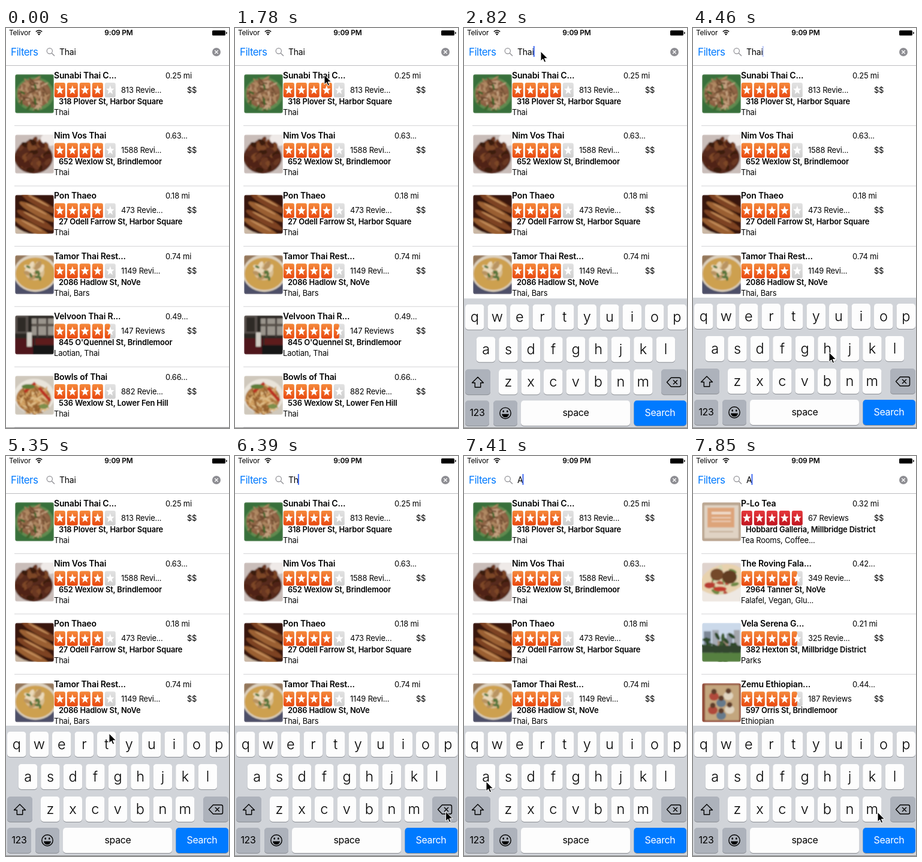
An HTML page for the animation above (8000 ms loop, 372 by 666 pixels).

```html
<!DOCTYPE html>
<html lang="en">
<head>
<meta charset="utf-8">
<title>Restaurant search</title>
<style>
html, body { margin: 0; width: 100%; height: 100%; overflow: hidden; background: #fff; }
svg { display: block; }
#stage { font-family: Inter, Roboto, sans-serif; letter-spacing: -.01em; }
</style>
</head>
<body>
<svg id="stage" width="372" height="666" viewBox="0 0 372 666"></svg>
<script>
const rect = (x, y, w, h, fill, more = '') =>
  `<rect x="${x}" y="${y}" width="${w}" height="${h}" fill="${fill}" ${more}/>`;
const oval = (x, y, rx, ry, fill, more = '') =>
  `<ellipse cx="${x}" cy="${y}" rx="${rx}" ry="${ry}" fill="${fill}" ${more}/>`;
const path = (d, fill, more = '') => `<path d="${d}" fill="${fill}" ${more}/>`;
const line = (d, color, width, more = '') =>
  path(d, 'none', `stroke="${color}" stroke-width="${width}" ${more}`);
const text = (x, y, size, str, more = '') =>
  `<text x="${x}" y="${y}" font-size="${size}" ${more}>${str}</text>`;
const bold = 'font-weight="600"', mid = 'text-anchor="middle"';

// Scattered food pieces from a seeded generator
function bits(seed, n, cx, cy, r, rx, ry, colors) {
  const rnd = () => (seed = seed * 16807 % 2147483647) / 2147483647;
  rnd();
  let out = '';
  for (let i = 0; i < n; i++) {
    const a = rnd() * 6.28, d = r * Math.sqrt(rnd());
    const x = (cx + d * Math.cos(a)).toFixed(1), y = (cy + d * Math.sin(a)).toFixed(1);
    out += oval(x, y, rx, ry, colors[i % colors.length],
      `transform="rotate(${Math.floor(rnd() * 180)} ${x} ${y})"`);
  }
  return out;
}

const photos = {
  noodles: rect(0, 0, 65, 65, '#39703a') + oval(33, 33, 32, 28, '#5f8a50') +
    oval(32, 32, 28, 24, '#8a6142') +
    bits(5, 90, 32, 31, 25, 7, 1.4, ['#b08a64', '#6b4a2e', '#c4a281', '#94694a']) +
    bits(9, 8, 28, 42, 22, 5, 1.6, ['#40642a']),
  fried: rect(0, 0, 65, 65, '#c9bdb9') + oval(57, 8, 14, 11, '#efeae8') + oval(31, 38, 32, 27, '#56291a') +
    bits(21, 40, 31, 35, 27, 7, 4, ['#6b3720', '#3a1a10', '#7d4628', '#4f2414']),
  ribs: rect(0, 0, 65, 65, '#37190d') +
    [0, 1, 2, 3].map(i => oval(32 + i * 3, 12 + i * 14, 34, 6.5, i % 2 ? '#9a5f33' : '#7d4220', 'transform="rotate(28 32 32)"') +
      oval(28 + i * 3, 9 + i * 14, 20, 1.6, '#c08a58', 'transform="rotate(28 32 32)"')).join('') +
    path('M0 52Q14 64 30 65H0Z', '#cbb8a4'),
  curry: rect(0, 0, 65, 65, '#94775a') + rect(0, 42, 65, 23, '#4d5068') + oval(34, 30, 36, 31, '#ddd2c0') +
    oval(34, 31, 33, 27, '#cda050') + oval(33, 28, 16, 14, '#d8be92') +
    bits(14, 16, 33, 27, 14, 7, 3.5, ['#ead9ba', '#b99462']) + bits(3, 7, 34, 28, 18, 4, 2, ['#56753a']),
  bar: rect(0, 0, 65, 65, '#2a2523') + rect(0, 0, 22, 30, '#57504b') + rect(4, 3, 14, 24, '#2f2a27') +
    rect(28, 5, 37, 28, '#9a948c') + rect(36, 4, 3, 32, '#3f3936') + rect(52, 4, 3, 32, '#3f3936') +
    rect(28, 14, 37, 4, '#57504a') + rect(0, 38, 32, 27, '#50191b') + rect(20, 28, 8, 24, '#cfcac3') +
    rect(34, 38, 31, 11, '#5d1d1e') + rect(30, 50, 35, 15, '#171314'),
  stirfry: rect(0, 0, 65, 65, '#cfc8bc') + oval(32, 34, 34, 29, '#e9e4da') + oval(31, 38, 29, 23, '#b07c42') +
    bits(31, 75, 31, 39, 25, 7, 1.5, ['#d3a466', '#94602f', '#dfbd88']) +
    line('M16 27L34 12M40 20L59 42', '#bb3322', 5) + oval(22, 18, 11, 4, '#5d7d38') + oval(48, 51, 8, 4, '#7d8f4c'),
  card: rect(0, 0, 65, 65, '#b9a48f') + rect(4, 5, 57, 55, '#e0d3c4') + rect(9, 9, 45, 33, '#dda47a') +
    rect(16, 16, 32, 4, '#f0dccb') + rect(16, 25, 32, 1.5, '#f0dccb') + rect(16, 31, 32, 1.5, '#f0dccb') +
    rect(12, 48, 40, 2, '#c3ae96'),
  wrap: rect(0, 0, 65, 65, '#dfd3cd') + oval(34, 30, 38, 26, '#e8d2ae', 'transform="rotate(-18 34 30)"') +
    bits(8, 24, 33, 29, 24, 7, 3, ['#6f8a45', '#d5d6b0', '#b9553f']) + oval(25, 20, 11, 10, '#74492a') +
    oval(46, 24, 12, 11, '#623c22') + oval(30, 44, 11, 4, '#c23c2e') + oval(12, 38, 8, 5, '#b83c30') +
    path('M0 46Q32 64 65 40V65H0Z', '#eee8e2'),
  park: rect(0, 0, 65, 65, '#cbd9ea') + rect(3, 14, 12, 32, '#7d8896') + rect(17, 6, 11, 38, '#a5abb5') +
    rect(41, 18, 10, 28, '#8f97a4') + rect(53, 8, 10, 38, '#a3a5ab') + rect(26, 30, 18, 14, '#a68d7c') +
    bits(17, 30, 32, 43, 30, 7, 3, ['#2f4a2a', '#3d5b33']) + rect(0, 0, 65, 12, '#cbd9ea') +
    rect(0, 38, 65, 12, '#33452e') + rect(0, 50, 65, 15, '#57803f'),
  book: rect(0, 0, 65, 65, '#8f4636') + rect(5, 3, 57, 59, '#c3a67e') +
    [[20, 14], [44, 13], [32, 25], [18, 37], [46, 36], [32, 46]].map(([x, y], i) =>
      oval(x, y + 8, 8, 7, ['#b04a3b', '#e0d4c0', '#667a8c'][i % 3]) + oval(x, y, 4.5, 4.5, '#5f3d2c')).join('')
};

function star(cx, cy, rx, ry) {
  let d = 'M';
  for (let i = 0; i < 10; i++) {
    const a = i * Math.PI / 5, k = i % 2 ? .42 : 1;
    d += (cx + rx * k * Math.sin(a)).toFixed(1) + ' ' + (cy - ry * k * Math.cos(a)).toFixed(1) + ' ';
  }
  return path(d + 'Z', '#fff');
}

function rating(score, hue) {
  let out = '';
  for (let i = 0; i < 5; i++) {
    const x = 80.8 + i * 21, part = Math.min(1, Math.max(0, score - i));
    out += rect(x, 28.5, 18, 24.5, 'url(#gray)', 'rx="3"');
    if (part) out += rect(x, 28.5, 18 * part, 24.5, `url(#${hue})`, 'rx="3"');
    out += star(x + 9, 41, 7.2, 8.2);
  }
  return out;
}

function row([photo, name, dist, score, reviews, address, kind, hue = 'orange'], i) {
  const y = 62.5 + i * 100.4;
  return `<g transform="translate(0 ${y.toFixed(1)})">` +
    `<svg x="15" y="14.5" width="65" height="65"><g clip-path="url(#round)"><g filter="url(#soft)">${photos[photo]}</g></g></svg>` +
    text(80, 21, 14, name, bold) + text(266, 21, 12.9, dist) + rating(score, hue) +
    text(192, 45, 12.9, reviews) + text(302, 45, 12.9, '$$') +
    text(88, 64, 12.9, address, bold) + text(80, 82, 12.9, kind) +
    rect(14, 99.6, 358, 1, '#d3d3d6') + '</g>';
}

const thai = [
  ['noodles', 'Sunabi Thai C...', '0.25 mi', 4, '813 Revie...', '318 Plover St, Harbor Square', 'Thai'],
  ['fried', 'Nim Vos Thai', '0.63...', 4, '1588 Revi...', '652 Wexlow St, Brindlemoor', 'Thai'],
  ['ribs', 'Pon Thaeo', '0.18 mi', 4, '473 Revie...', '27 Odell Farrow St, Harbor Square', 'Thai'],
  ['curry', 'Tamor Thai Rest...', '0.74 mi', 4, '1149 Revi...', '2086 Hadlow St, NoVe', 'Thai, Bars'],
  ['bar', 'Velvoon Thai R...', '0.49...', 4.5, '147 Reviews', "845 O'Quennel St, Brindlemoor", 'Laotian, Thai'],
  ['stirfry', 'Bowls of Thai', '0.66...', 4, '882 Revie...', '536 Wexlow St, Lower Fen Hill', 'Thai']
];
const other = [
  ['card', 'P-Lo Tea', '0.32 mi', 5, '67 Reviews', 'Hobbard Galleria, Millbridge District', 'Tea Rooms, Coffee...', 'red'],
  ['wrap', 'The Roving Fala...', '0.42...', 4.5, '349 Revie...', '2964 Tanner St, NoVe', 'Falafel, Vegan, Glu...'],
  ['park', 'Vela Serena G...', '0.21 mi', 4.5, '325 Revie...', '382 Hexton St, Millbridge District', 'Parks'],
  ['book', 'Zemu Ethiopian...', '0.44...', 4.5, '187 Reviews', '597 Orris St, Brindlemoor', 'Ethiopian']
];

const key = (x, y, w, fill = '#fdfdfd') =>
  rect(x, y + 1, w, 42, '#8b8e94', 'rx="5"') + rect(x, y, w, 42, fill, 'rx="5"');

function keyboard(upper) {
  const gray = '#adb2bb';
  let out = rect(0, 449, 372, 217, '#d1d4d9');
  [['qwertyuiop', 2, 459], ['asdfghjkl', 20.7, 513], ['zxcvbnm', 58, 567]].forEach(([chars, x0, y]) =>
    [...chars].forEach((c, i) => {
      const x = x0 + i * 37.5;
      out += key(x, y, 31.5) + (upper
        ? text(x + 15.8, y + 29, 22, c.toUpperCase(), mid)
        : text(x + 15.8, y + 28.5, 23.5, c, mid + ' font-weight="350"'));
    }));
  const label = (x, str, color = '#000') => text(x, 645, 15.9, str, `${mid} fill="${color}" letter-spacing="-.3"`);
  return out + key(2, 567, 42, upper ? '#fdfdfd' : gray) +
    path('M23 580L32.5 589.5H27.7V597H18.3V589.5H13.5Z', upper ? '#000' : 'none',
      'stroke="#000" stroke-width="1.4" stroke-linejoin="round"') +
    key(329, 567, 42, gray) +
    line('M338.5 588.5L345.5 581H359Q361.5 581 361.5 583.5V593.5Q361.5 596 359 596H345.5ZM349 585L356 592M356 585L349 592', '#000', 1.4, 'stroke-linejoin="round"') +
    key(2, 619, 40, gray) + label(22, '123') +
    key(49, 619, 40, gray) + oval(69, 640, 9.2, 9.2, 'none', 'stroke="#000" stroke-width="1.4"') +
    oval(65.7, 637, 1.3, 1.8, '#000') + oval(72.3, 637, 1.3, 1.8, '#000') +
    path('M63 641.5H75Q74 647 69 647T63 641.5Z', '#000') +
    key(95, 619, 182) + label(186.5, 'space') +
    key(283.5, 619, 87.5, upper ? gray : '#007aff') + label(327, 'Search', upper ? '#7f848c' : '#fff');
}

const gradient = (id, top, bottom) =>
  `<linearGradient id="${id}" x2="0" y2="1"><stop stop-color="${top}"/><stop offset="1" stop-color="${bottom}"/></linearGradient>`;
const $ = id => document.getElementById(id);

$('stage').innerHTML = '<defs>' + gradient('orange', '#f58a3c', '#e9480f') + gradient('red', '#e5383c', '#c0151f') +
  gradient('gray', '#e2e2e2', '#cfcfcf') +
  '<filter id="soft"><feGaussianBlur stdDeviation=".8"/></filter>' +
  '<clipPath id="round"><rect width="65" height="65" rx="4"/></clipPath></defs>' +
  rect(0, 0, 372, 666, '#fff') +
  text(5, 12, 11.9, 'Telivor') + text(188, 12, 11.9, '9:09 PM', mid + ' ' + bold) +
  line('M49.8 6.3Q55 1.8 60.2 6.3M51.8 8.5Q55 5.8 58.2 8.5', '#000', 1.5) + path('M53 10Q55 8.4 57 10L55 12.3Z', '#000') +
  rect(344, 4, 22, 8.5, '#000', 'rx="1.5"') + rect(367, 6.5, 1.6, 3.5, '#000', 'rx=".8"') +
  text(8, 46, 16.9, 'Filters', 'fill="#007aff" letter-spacing="-.5"') +
  oval(72.8, 38.3, 4.6, 4.6, 'none', 'stroke="#8e8e93" stroke-width="1.2"') + line('M76.2 41.7L81 46.5', '#8e8e93', 1.3) +
  text(89, 45, 13.9, '', 'id="query"') +
  text(89, 45, 13.9, 'eg. chinese food, burger', 'id="hint" fill="#98989d" letter-spacing="-.2"') +
  `<g id="clear">${oval(351, 40, 7, 7, '#8e8e93')}${line('M348.3 37.3L353.7 42.7M353.7 37.3L348.3 42.7', '#fff', 1.3)}</g>` +
  rect(0, 30, 2, 18, '#426bf2', 'id="caret"') +
  rect(0, 62, 372, 1, '#bcbcbf') +
  `<g id="thai">${thai.map(row).join('')}</g><g id="other">${other.map(row).join('')}</g>` +
  `<g id="keys"><g id="lower">${keyboard(false)}</g><g id="upper">${keyboard(true)}</g></g>` +
  rect(0, 665, 372, 1, '#8c8c8c') +
  path('M0 0V16L3.7 12.6 6.1 18 8.6 17 6.3 11.7H11.5Z', '#000', 'id="cursor" stroke="#fff" stroke-width="1"');

// Pointer stops: step, x, y
const stops = [
  [0, 310, 655], [6, 147, 245], [7, 149, 232], [10, 149, 78], [12, 121, 38], [14, 121, 38], [17, 128, 39],
  [20, 130, 44], [22, 184, 450], [23, 184, 450], [25, 174, 464], [28, 227, 540], [29, 231, 548], [31, 30, 545],
  [32, 30, 542], [34, 172, 462], [36, 278, 480], [38, 359, 632], [39, 352, 592], [44, 351, 592], [46, 49, 591],
  [48, 37, 542], [49, 37, 542], [51, 308, 593]
];
function pointer(n) {
  const i = Math.max(1, stops.findIndex(s => s[0] >= n));
  const [a, ax, ay] = stops[i - 1], [b, bx, by] = stops[i], k = (n - a) / (b - a);
  return `translate(${ax + (bx - ax) * k} ${ay + (by - ay) * k})`;
}
const show = (id, on) => $(id).style.display = on ? '' : 'none';

function draw(ms) {
  const n = Math.min(51, Math.floor((ms - 298) / 148)), t = 300 + 148 * n;
  const typed = n >= 48 ? 'A' : 'Thai'.slice(0, Math.max(0, 43 - n));

  $('query').textContent = typed;
  show('hint', !typed);
  show('clear', typed);
  show('upper', !typed);
  show('lower', typed);
  show('thai', n < 50);
  show('other', n >= 50);

  const blink = .5 + 1.2 * Math.sin(2 * Math.PI * ((t - 2370) / 1000 - .09));
  $('caret').setAttribute('x', typed ? 88 + $('query').getComputedTextLength() : 88);
  $('caret').setAttribute('opacity', n < 14 ? 0 : n >= 40 ? 1 : Math.min(1, Math.max(0, blink)));

  const u = Math.max(0, 18.26 * (t - 2420) / 1000);
  $('keys').setAttribute('transform', `translate(0 ${217 * (1 + u) * Math.exp(-u)})`);

  show('cursor', n >= 0);
  if (n >= 0) $('cursor').setAttribute('transform', pointer(n));
}

const start = performance.now();
(function tick() {
  draw((performance.now() - start) % 8000);
  requestAnimationFrame(tick);
})();
</script>
</body>
</html>
```
